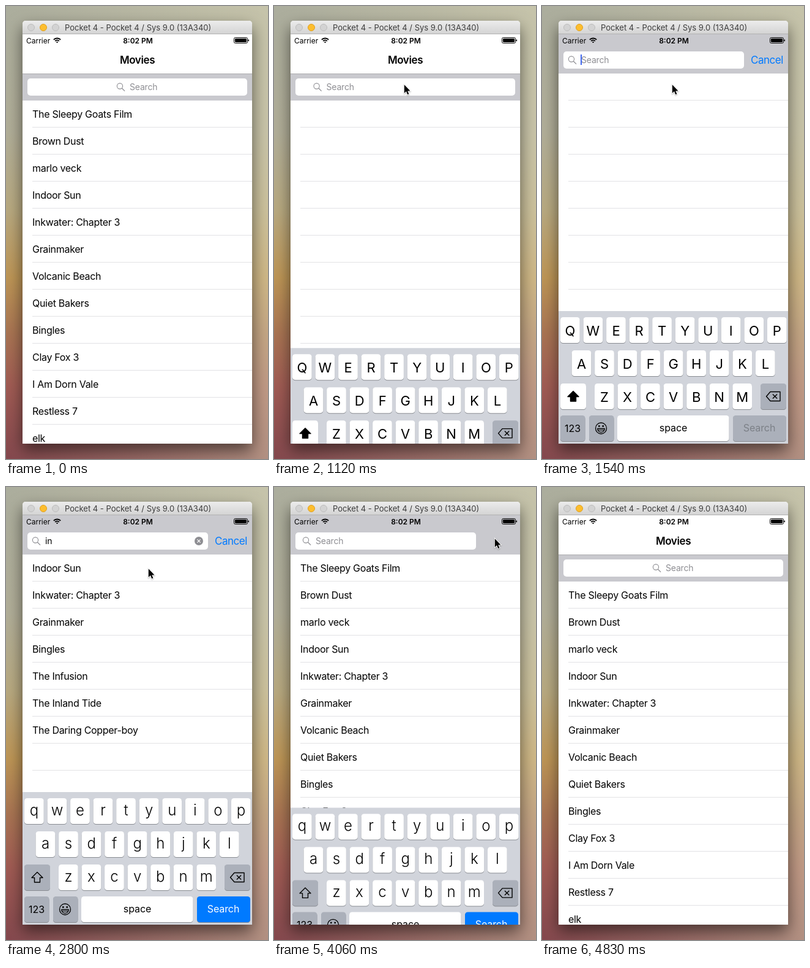
These frames come from a looping animation (428 px wide and 738 px high, 6020 ms). An HTML page with a canvas:

```html
<!DOCTYPE html>
<html lang="en">
<head>
<meta charset="utf-8">
<title>Movie search</title>
<style>
html, body { margin: 0; width: 100%; height: 100%; overflow: hidden; }
canvas { display: block; width: 428px; height: 738px; }
</style>
</head>
<body>
<canvas id="stage" width="428" height="738"></canvas>
<script>
const LOOP = 6020, STEP = 70;
const LEFT = 27, RIGHT = 402, BOTTOM = 713, ROW = 44;
const GRAY = '#8e8e93', BAR = '#c9c9ce', BLUE = '#007aff';
const c = document.getElementById('stage').getContext('2d');

const movies = ['The Sleepy Goats Film', 'Brown Dust', 'marlo veck', 'Indoor Sun',
  'Inkwater: Chapter 3', 'Grainmaker', 'Volcanic Beach', 'Quiet Bakers', 'Bingles',
  'Clay Fox 3', 'I Am Dorn Vale', 'Restless 7', 'elk', 'The Infusion',
  'The Inland Tide', 'The Daring Copper-boy'];

// pointer path: time, x, y
const path = [[210, 0, 368], [350, 110, 235], [490, 180, 155], [630, 209, 131], [700, 212, 128],
  [840, 212, 127], [2450, 212, 127], [2800, 232, 132], [2940, 250, 141], [3080, 275, 130],
  [3360, 335, 100], [3710, 360, 83], [4060, 360, 83], [4620, 356, 88], [4690, 225, 175],
  [4760, 50, 278]];

const clamp = x => Math.min(1, Math.max(0, x));
const mix = (a, b, p) => a + (b - a) * p;
const smooth = (t, start, span) => { const x = clamp((t - start) / span); return x * x * (3 - 2 * x); };
const easeOut = (t, start, span) => 1 - (1 - clamp((t - start) / span)) ** 3;

function rect(x, y, w, h, color, r = 0) {
  c.fillStyle = color;
  c.beginPath();
  c.roundRect(x, y, w, h, r);
  c.fill();
}

function text(s, x, y, size, color = '#000', { weight = 400, align = 'left', gap = 0 } = {}) {
  c.font = `${weight} ${size}px Inter, "Liberation Sans", sans-serif`;
  c.letterSpacing = gap + 'px';
  c.textAlign = align;
  c.fillStyle = color;
  c.fillText(s, x, y);
}

function line(points, color, width, close) {
  c.strokeStyle = color;
  c.lineWidth = width;
  c.beginPath();
  points.forEach(([x, y]) => c.lineTo(x, y));
  if (close) c.closePath();
  c.stroke();
}

function disc(x, y, r, fill, edge, width = 1) {
  c.beginPath();
  c.arc(x, y, r, 0, 7);
  if (fill) { c.fillStyle = fill; c.fill(); }
  if (edge) { c.strokeStyle = edge; c.lineWidth = width; c.stroke(); }
}

function cross(x, y, r, color, width) {
  line([[x - r, y - r], [x + r, y + r]], color, width);
  line([[x - r, y + r], [x + r, y - r]], color, width);
}

function gradient(x, y, stops) {
  const g = c.createLinearGradient(0, 0, x, y);
  stops.forEach(([at, color]) => g.addColorStop(at, color));
  return g;
}

function wallpaper() {
  rect(0, 0, 428, 738, gradient(0, 738, [[0, '#abad9d'], [.28, '#b1ae98'], [.45, '#b8a980'],
    [.6, '#bd9555'], [.72, '#a97452'], [.84, '#a05a53'], [1, '#84474d']]));
  c.globalAlpha = .5;
  rect(0, 0, 428, 738, gradient(428, 0, [[0, '#d8d0b000'], [1, '#e0dab8']]));
  c.globalAlpha = 1;
  c.save();
  c.shadowColor = 'rgba(0,0,0,.55)';
  c.shadowBlur = 26;
  c.shadowOffsetY = 11;
  rect(LEFT, 24, 375, 689, '#fff', [5, 5, 0, 0]);
  c.restore();
}

function titleBar() {
  const g = c.createLinearGradient(0, 24, 0, 45);
  g.addColorStop(0, '#ececec');
  g.addColorStop(1, '#d4d4d4');
  rect(LEFT, 24, 375, 22, g, [5, 5, 0, 0]);
  rect(LEFT, 45, 375, 1, '#b2b2b2');
  disc(41, 35, 5.5, '#d3d3d3', '#bdbdbd');
  disc(61, 35, 5.5, '#fdbe2e', '#dfa023');
  disc(81, 35, 5.5, '#d3d3d3', '#bdbdbd');
  text('Pocket 4 - Pocket 4 / Sys 9.0 (13A340)', 96, 40, 13, '#3c3c3c');
}

function statusBar() {
  text('Carrier', 33, 61, 12);
  text('8:02 PM', 215.5, 61, 12, '#000', { weight: 600, align: 'center' });
  c.strokeStyle = '#000';
  c.lineWidth = 1.9;
  for (const r of [1.5, 4.7, 8]) {
    c.beginPath();
    c.arc(83.5, 60.5, r, -Math.PI * .75, -Math.PI * .25);
    c.stroke();
  }
  c.lineWidth = 1;
  c.beginPath();
  c.roundRect(372.5, 51.5, 22, 9, 2);
  c.stroke();
  rect(374, 53, 19, 6, '#000', 1);
  rect(395.5, 54.5, 1.5, 3, '#000', 1);
}

function list(top, items) {
  for (let i = 0, y = top; y < BOTTOM; i++, y += ROW) {
    if (items[i]) text(items[i], 43, y + 27.5, 16, '#000', { gap: -.3 });
    rect(43, y + 43, 359, 1, '#e2e2e5');
  }
}

function header(active) {
  const edge = 110 - 44 * active;
  rect(LEFT, 46, 375, edge - 2, BAR);
  c.save();
  c.globalAlpha = 1 - active;
  c.beginPath();
  c.rect(LEFT, 46, 375, edge - 45);
  c.clip();
  rect(LEFT, 46, 375, edge - 46, '#fff');
  rect(LEFT, edge, 375, 1, '#adadb0');
  text('Movies', 214.5, edge - 16, 17, '#000', { weight: 600, align: 'center', gap: -.4 });
  c.restore();
}

function searchField(t, active, slide, query) {
  const mid = 132 - 44 * active;
  const icon = mix(181, 43, slide);
  rect(35, mid - 14, mix(359, 295, active), 28, '#fff', 5);
  disc(icon + 5, mid - 1.5, 4.6, null, GRAY, 1.1);
  line([[icon + 8.4, mid + 2], [icon + 13, mid + 6.6]], GRAY, 1.3);
  text(query || 'Search', icon + 21, mid + 5, 14, query ? '#000' : GRAY, { gap: -.2 });
  if (t >= 4060) return;

  if (active === 1) {
    const beat = (t - 2520 + 840) % 840;
    const glow = t < 2520 ? 1 : beat < 420 ? 1 - clamp((beat + 70) / 140) : clamp((beat - 350) / 140);
    const x = query ? 64 + c.measureText(query).width : 63;
    c.globalAlpha = glow;
    rect(x, 79, 2, 17, '#4269ef');
    c.globalAlpha = 1;
  }
  if (query) {
    disc(315, 88, 7, GRAY);
    cross(315, 88, 2.6, '#fff', 1.2);
  }
  c.globalAlpha = t >= 3780 ? .25 : active;
  text('Cancel', 341, mid + 5.5, 17, BLUE, { gap: -.5 });
  c.globalAlpha = 1;
}

function key(x, y, w, color) {
  rect(x, y + 1, w, 42, '#8a8d93', 4.5);
  rect(x, y, w, 42, color, 4.5);
}

function keyboard(top, upper, ready) {
  const dark = '#abb0ba';
  rect(LEFT, top, 375, 216, '#d1d4db');
  [['QWERTYUIOP', 30], ['ASDFGHJKL', 48.6], ['ZXCVBNM', 86]].forEach(([letters, left], row) => {
    const y = top + 10 + row * 54;
    [...letters].forEach((ch, i) => {
      const x = left + i * 37.55;
      key(x, y, 31.7, '#fff');
      if (upper) text(ch, x + 15.9, y + 29.5, 22, '#000', { align: 'center' });
      else text(ch.toLowerCase(), x + 15.9, y + 28, 24, '#000', { weight: 300, align: 'center' });
    });
  });

  const y3 = top + 118, y4 = top + 170;
  key(30, y3, 42, upper ? '#fff' : dark);
  const arrow = [[51, 12.5], [60, 21.5], [55.5, 21.5], [55.5, 29], [46.5, 29], [46.5, 21.5], [42, 21.5]]
    .map(([x, y]) => [x, y3 + y]);
  c.lineJoin = 'round';
  line(arrow, '#000', 1.4, true);
  c.fillStyle = '#000';
  if (upper) c.fill();

  key(357, y3, 42, dark);
  line([[366.5, 21], [373, 13.5], [389, 13.5], [389, 28.5], [373, 28.5]].map(([x, y]) => [x, y3 + y]),
    '#000', 1.4, true);
  cross(380.5, y3 + 21, 3.6, '#000', 1.4);

  const label = { align: 'center', gap: -.1 };
  key(30, y4, 40.5, dark);
  text('123', 50, y4 + 27, 16, '#000', label);
  key(77, y4, 40.5, dark);
  disc(96.5, y4 + 21, 9, null, '#000', 1.3);
  disc(93.3, y4 + 17.5, 1.4, '#000');
  disc(99.7, y4 + 17.5, 1.4, '#000');
  c.strokeStyle = '#000';
  c.lineWidth = 1.3;
  c.beginPath();
  c.arc(96.5, y4 + 21.5, 5.8, 0, Math.PI);
  c.closePath();
  c.stroke();
  line([[91.5, y4 + 24], [101.5, y4 + 24]], '#000', 1);
  key(123, y4, 182.5, '#fff');
  text('space', 214.5, y4 + 26, 16, '#000', label);
  key(312, y4, 87, ready ? BLUE : dark);
  text('Search', 355, y4 + 26, 16, ready ? '#fff' : '#7c8087', label);
}

function pointer(t) {
  if (t < 210 || t >= 4830) return;
  const i = path.findLastIndex(p => p[0] <= t);
  const a = path[i], b = path[i + 1] || a;
  const p = b === a ? 0 : (t - a[0]) / (b[0] - a[0]);
  c.save();
  c.translate(mix(a[1], b[1], p) + .8, mix(a[2], b[2], p) + 1.2);
  c.shadowColor = 'rgba(0,0,0,.3)';
  c.shadowBlur = 2;
  c.shadowOffsetY = 1;
  c.lineJoin = 'miter';
  line([[0, 0], [0, 13.8], [3.2, 10.9], [5.4, 16], [7.6, 15], [5.4, 10.2], [9.6, 10]], '#fff', 1.8, true);
  c.shadowColor = 'transparent';
  c.fillStyle = '#000';
  c.fill();
  c.restore();
}

function draw(t) {
  const leaving = t >= 4060;
  const active = leaving ? 1 - smooth(t, 4060, 490) : smooth(t, 1260, 280);
  const slide = leaving ? 1 - smooth(t, 4010, 490) : smooth(t, 910, 280);
  const raised = leaving ? 1 - easeOut(t, 4040, 490) : easeOut(t, 950, 490);
  const query = leaving || t < 1960 ? '' : t < 2100 ? 'i' : 'in';
  const items = t < 980 || leaving ? movies
    : query ? movies.filter(m => m.toLowerCase().includes(query)) : [];

  wallpaper();
  c.save();
  c.beginPath();
  c.rect(LEFT, 24, RIGHT - LEFT, BOTTOM - 24);
  c.clip();
  list(154 - 44 * active, items);
  header(active);
  searchField(t, active, slide, query);
  statusBar();
  titleBar();
  if (raised > 0) keyboard(BOTTOM - 216 * raised, t < 2030, t >= 1960);
  c.restore();
  pointer(t);
}

const begin = performance.now();
function tick() {
  const t = (performance.now() - begin) % LOOP;
  draw(Math.floor(t / STEP) * STEP);
  requestAnimationFrame(tick);
}
tick();
</script>
</body>
</html>
```
